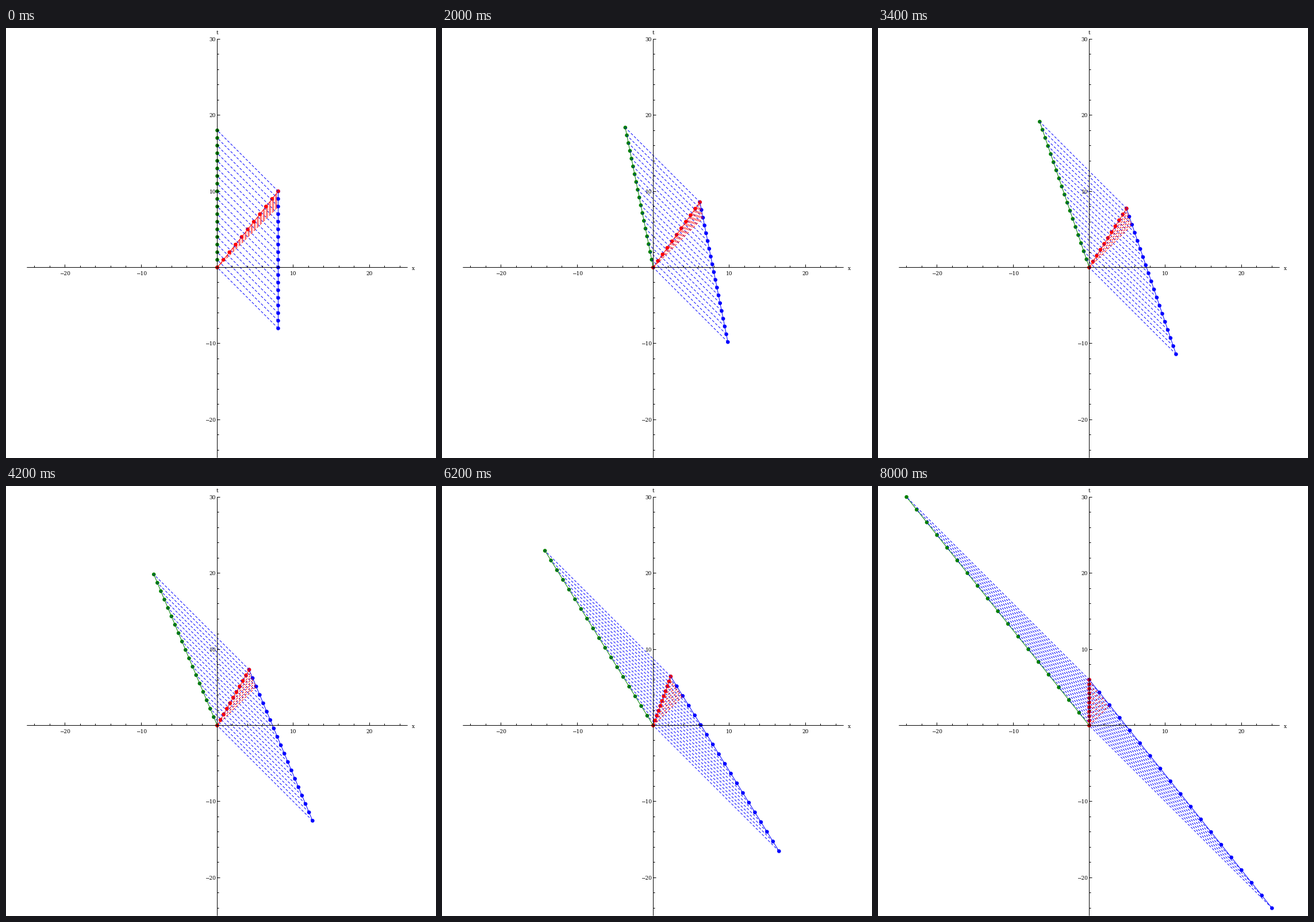
Write a matplotlib script that moves like this. It is 748 px wide and 748 px high and loops after 8100 ms.

```python
import numpy as np
import matplotlib.pyplot as plt
from matplotlib.animation import FuncAnimation
from matplotlib.collections import LineCollection

SIZE, DPI = 748, 64
PX = 72 / DPI                      # one pixel in points
ORIGIN, UNIT = np.array([367.5, 416.5]), 13.245
FRAMES = 81
RED, GREEN, BLUE = "#ff0000", "#008000", "#0000ff"

fig = plt.figure(figsize=(SIZE / DPI, SIZE / DPI), dpi=DPI, facecolor="white")
ax = fig.add_axes([0, 0, 1, 1])
ax.set(xlim=(0, SIZE), ylim=(SIZE, 0))
ax.axis("off")


def to_pixels(events):
    return ORIGIN + UNIT * np.asarray(events) * [1, -1]


def boost(events, v):
    """Lorentz transform of (x, t) events into a frame moving at speed v."""
    x, t = events[..., 0], events[..., 1]
    gamma = 1 / np.sqrt(1 - v * v)
    return np.stack([gamma * (x - v * t), gamma * (t - v * x)], axis=-1)


def label(x, y, text, ha="center"):
    ax.text(x, y, text, ha=ha, va="center_baseline", zorder=10,
            family="DejaVu Serif", size=9 * PX)


def pixel_centre(value):
    return np.floor(value) + 0.5


def draw_axes():
    x0, y0 = ORIGIN
    strokes = [[to_pixels((-25, 0)), to_pixels((25, 0))],
               [to_pixels((0, -25)), to_pixels((0, 30))]]
    for n in range(-24, 31, 2):
        if n == 0:
            continue
        major = n % 10 == 0
        length = 5 if major else 3
        text = str(n).replace("-", "\u2212")
        if n <= 24:
            x = pixel_centre(to_pixels((n, 0))[0])
            strokes.append([(x, y0), (x, y0 - length)])
            if major:
                label(x, y0 + 10, text)
        y = pixel_centre(to_pixels((0, n))[1])
        strokes.append([(x0, y), (x0 + length, y)])
        if major:
            label(x0 - 2.5, y, text, "right")
    for stroke in strokes:
        ax.plot(*np.array(stroke).T, color="black", lw=PX, zorder=9,
                solid_capstyle="butt", snap=False)
    label(708.5, 417, "x")
    label(368, 7.5, "t")


# Events in the rest frame
k = np.arange(19.0)
home = np.stack([0 * k, k], axis=-1)
star = np.stack([0 * k + 8, k - 8], axis=-1)
n = np.arange(11.0)
ship = np.stack([0.8 * n, n], axis=-1)
arrival = np.stack([0 * n + 8, 8 + 0.2 * n], axis=-1)

worldlines = [(home, GREEN), (star, BLUE), (ship, RED)]
signals = [(np.stack([star, home], axis=1), BLUE),
           (np.stack([ship, arrival], axis=1), RED)]

dots, paths, dashes = [], [], []
for i, (_, color) in enumerate(worldlines):
    dots.append(ax.scatter([], [], s=(6.6 * PX) ** 2, c=color,
                           edgecolors="none", zorder=2 + 0.1 * i))
    paths += ax.plot([], [], color=color, lw=PX, zorder=3, snap=False)
for _, color in signals:
    rays = LineCollection([], colors=color, linewidths=PX,
                          linestyles=[(0, (4.5, 3))], zorder=4)
    ax.add_collection(rays, autolim=False)
    dashes.append(rays)
draw_axes()


def update(frame):
    v = 0.01 * frame
    for rays, (segments, _) in zip(dashes, signals):
        rays.set_segments(to_pixels(boost(segments, v)))
    for dot, path, (events, _) in zip(dots, paths, worldlines):
        points = to_pixels(boost(events, v))
        dot.set_offsets(points)
        path.set_data(*points.T)
    return dashes + paths + dots


anim = FuncAnimation(fig, update, frames=FRAMES, interval=100,
                     repeat=True, repeat_delay=0, blit=False)
plt.show()
```
